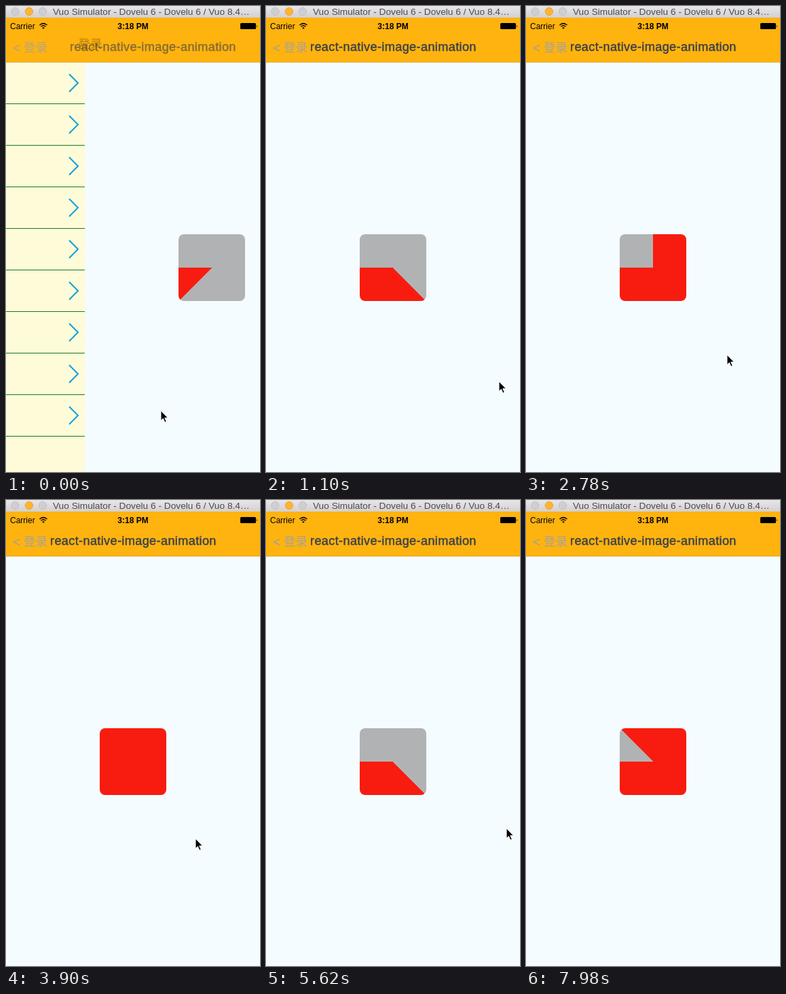
These frames come from a looping animation (374x684 px, 8000 ms). An HTML page:

```html
<!DOCTYPE html>
<html lang="en">
<head>
<meta charset="utf-8">
<style>
  html, body { margin: 0; width: 100%; height: 100%; overflow: hidden; background: #f5fcff; }
  svg { position: absolute; left: 0; top: 0; display: block; }
  text { font-family: "Liberation Sans", Arial, sans-serif; white-space: pre; }
  .cjk { font-family: "Noto Sans CJK SC", "Noto Sans CJK", sans-serif; font-size: 17.5px; }
  #seal {
    position: absolute; left: 138px; top: 335px; width: 98px; height: 98px;
    border-radius: 8px;
  }
</style>
</head>
<body>
<div id="seal"></div>
<svg width="374" height="684" viewBox="0 0 374 684">
  <defs>
    <linearGradient id="chrome" x2="0" y2="1">
      <stop stop-color="#e8e6e9"/><stop offset="1" stop-color="#d2d0d3"/>
    </linearGradient>
  </defs>

  <g id="list"><rect y="83" width="374" height="601" fill="#fefbd9"/></g>

  <rect y="17" width="374" height="66" fill="#ffb30f"/>
  <rect y="82" width="374" height="1" fill="#e6ad35"/>
  <rect width="374" height="17" fill="url(#chrome)"/>
  <g stroke="#b9b8ba" stroke-width=".7" fill="#cfced0">
    <circle cx="13.500" cy="8" r="5.700"/>
    <circle cx="34" cy="8" r="5.700" fill="#ffb52c" stroke="#dc9a2c"/>
    <circle cx="54" cy="8" r="5.700"/>
  </g>
  <text x="69" y="13" font-size="13.700" fill="#4b4a4d">Vuo Simulator - Dovelu 6 - Dovelu 6 / Vuo 8.4…</text>

  <text x="6" y="34" font-size="12">Carrier</text>
  <g fill="none" stroke="#000" stroke-width="1.500">
    <path d="M49.500 28q5.500-4.800 11 0M51.500 30.300q3.500-3 7 0"/>
    <path d="M55 33.800l-1.900-1.900q1.900-1.500 3.800 0z" fill="#000" stroke="none"/>
  </g>
  <text x="187" y="34" font-size="12" font-weight="bold" text-anchor="middle">3:18 PM</text>
  <rect x="345" y="25" width="23" height="9" rx="1.500"/>
  <path d="M369 27.500q1.500 2 0 4z"/>

  <g id="back" fill="#a5a298">
    <path d="M20 57.500L11.500 61.700L20 66" fill="none" stroke="#a5a298" stroke-width="1.500"/>
    <text class="cjk" x="26" y="67">登录</text>
  </g>
  <text id="oldTitle" class="cjk" y="62" fill="#6b4b05">登录</text>
  <text id="title" y="66" font-size="18.200" letter-spacing=".33" fill="#3c4048" stroke="#3c4048" stroke-width=".45">react-native-image-animation</text>

  <path id="pointer" d="M0 0v14.500l3.400-3 2.500 5.700 2.400-1-2.500-5.500h4.700z" stroke="#fff" stroke-width="1"/>
</svg>
<script>
const LOOP = 8000, WIDTH = 374, ROW = 61;
const SECTOR_MS = 590, SECTOR_START = 1.8;
const $ = id => document.getElementById(id);

// [time, x, y]
const pointerPath = [
  [0, 228, 594], [400, 300, 579], [1100, 343, 551], [1600, 299, 520], [2300, 296, 512],
  [3340, 296, 512], [4180, 271, 490], [4880, 260, 475], [5100, 260, 475], [5740, 376, 484]
];

let rows = "";
for (let i = 0; i < 9; i++) {
  const y = 143 + i * ROW;
  rows += `<rect y="${y}" width="374" height="1" fill="#1a7a1e"/>
    <path d="M351 ${y - 43}l13 13l-13 13" fill="none" stroke="#129fdd" stroke-width="2"/>`;
}
$("list").insertAdjacentHTML("beforeend", rows);

// Critically damped spring, already under way when the loop begins.
function remaining(t) {
  const x = 2.39 + t * 0.00665;
  return t > 900 ? 0 : (1 + x) * Math.exp(-x);
}

function pointerAt(t) {
  const next = pointerPath.findIndex(p => p[0] > t);
  if (next < 0) return [WIDTH + 20, 484];
  const [t0, x0, y0] = pointerPath[next - 1], [t1, x1, y1] = pointerPath[next];
  const k = (t - t0) / (t1 - t0);
  return [x0 + (x1 - x0) * k, y0 + (y1 - y0) * k].map(Math.round);
}

function draw(t) {
  const left = remaining(t), edge = Math.round(left * WIDTH);

  $("list").setAttribute("transform", `translate(${edge - WIDTH})`);
  $("title").setAttribute("x", 65 + Math.round(edge / 4));
  $("title").setAttribute("opacity", 1 - left * 1.25);
  $("back").setAttribute("opacity", 1 - left * 0.6);
  $("oldTitle").setAttribute("x", 78 + left * 92);
  $("oldTitle").setAttribute("opacity", Math.max(0, left * 2 - 0.12));

  // The red part grows by an eighth of a turn at a time, from the left counter-clockwise.
  const eighths = (Math.floor(t / SECTOR_MS + SECTOR_START) - 1) % 8 + 1;
  const seal = $("seal").style;
  seal.transform = `translateX(${edge}px)`;
  seal.background = `conic-gradient(from 270deg, #b1b2b3 ${360 - eighths * 45}deg, #f81c10 0)`;

  $("pointer").setAttribute("transform", `translate(${pointerAt(t)})`);
}

const start = performance.now();
function tick() {
  draw((performance.now() - start) % LOOP);
  requestAnimationFrame(tick);
}
tick();
</script>
</body>
</html>
```
